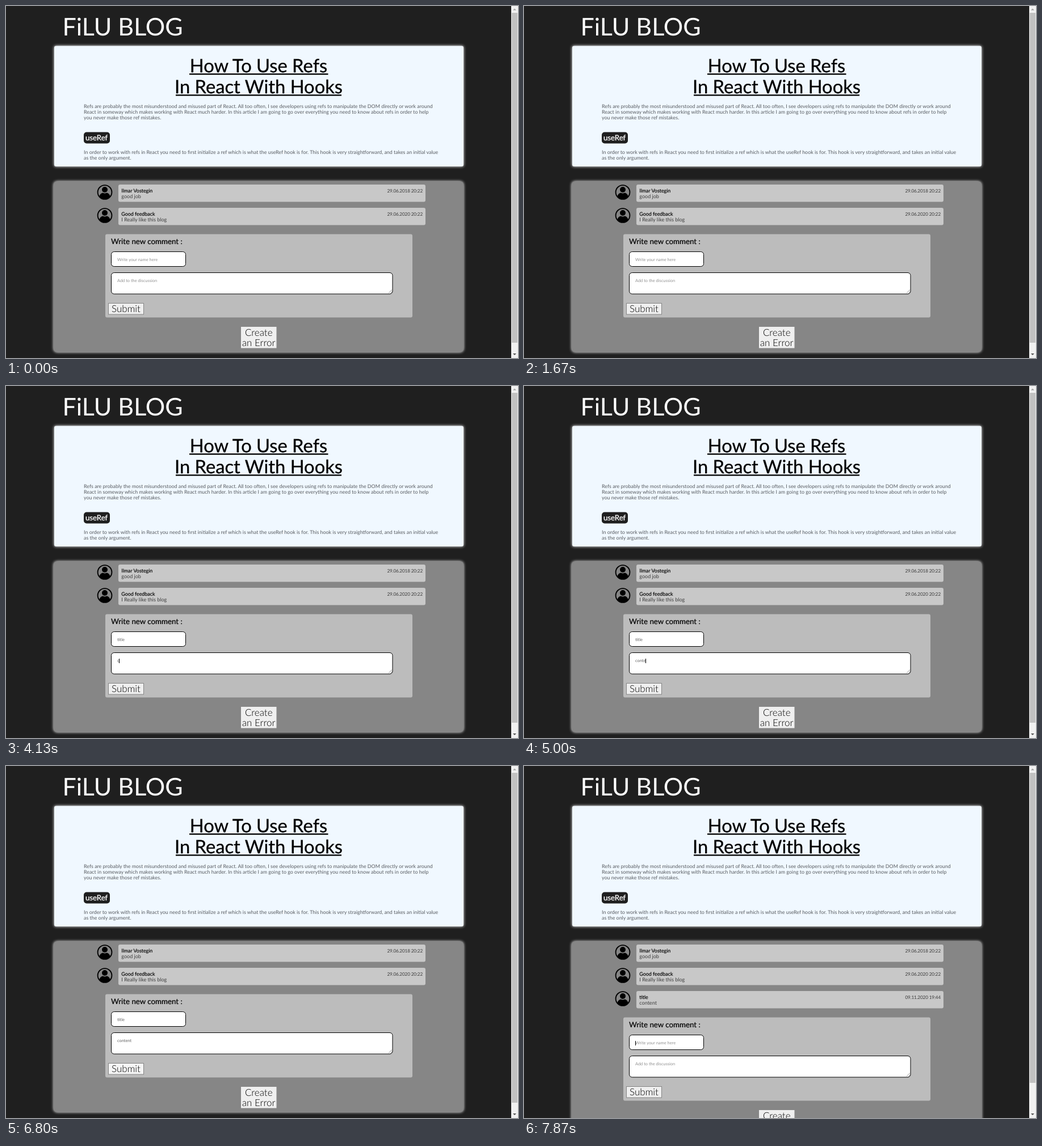
Recreate the animation shown at these times as an HTML page. Size 902 by 621 pixels, loop 8 s.

```html
<!DOCTYPE html>
<html lang="en">
<head>
<meta charset="utf-8">
<title>Blog comments</title>
<style>
  html, body { margin: 0; width: 100%; height: 100%; overflow: hidden; background: #1f1f1f; }
  svg { display: block; width: 902px; height: 621px; }
  text { font-family: Lato, "Open Sans", sans-serif; text-rendering: geometricPrecision; white-space: pre; }
  .logo { font-size: 43px; fill: #fff; }
  .title { font-size: 32.7px; text-anchor: middle; stroke: #000; stroke-width: .3px; }
  .body { font-size: 8.9px; fill: #585c60; }
  .tag { font-size: 13.2px; fill: #fff; stroke: #fff; stroke-width: .3px; }
  .heading { font-size: 13.3px; stroke: #000; stroke-width: .2px; }
  .name { font-size: 8.9px; stroke: #000; stroke-width: .15px; }
  .comment { font-size: 9.05px; fill: #3c3c3c; }
  .date { font-size: 8.2px; letter-spacing: -.15px; text-anchor: end; fill: #3c3c3c; }
  .field { font-size: 7.45px; }
  .button { font-size: 17px; font-weight: 300; text-anchor: middle; }
</style>
</head>
<body>
<svg id="stage" viewBox="0 0 902 621"></svg>
<script>
const LOOP = 8000;
const SUBMIT_AT = 6930;
const PRESS_AT = 6670;
const ROW = 41;
const FIELD_X = 196;

const box = (x, y, w, h, fill, extra = '') =>
  `<rect x="${x}" y="${y}" width="${w}" height="${h}" fill="${fill}" ${extra}/>`;
const label = (cls, x, y, content, extra = '') =>
  `<text class="${cls}" x="${x}" y="${y}" ${extra}>${content}</text>`;
const lines = (cls, x, y, step, list) =>
  list.map((line, i) => label(cls, x, y + i * step, line)).join('');

const avatar = `
  <circle cx="174" cy="328.5" r="12.4" fill="none" stroke="#000" stroke-width="1.9"/>
  <circle cx="174" cy="324" r="5"/>
  <path d="M164.5 336Q166 330.2 170.5 329.6Q174 331.6 177.5 329.6Q182 330.2 183.5 336A12 12 0 0 1 164.5 336Z"/>`;

const comment = (row, name, content, date) => `
  <g id="comment${row}" transform="translate(0 ${row * ROW})">
    ${avatar}
    ${box(198, 315, 541, 30.5, '#c8c8c8', 'rx="3"')}
    ${label('name', 203.3, 328.5, name)}
    ${label('comment', 203.3, 338.5, content)}
    ${label('date', 734, 328.5, date)}
  </g>`;

const header = `
  ${label('logo', 99.5, 51.5, 'FiLU BLOG')}
  ${box(85, 70.5, 721, 212.5, '#f0f8ff', 'rx="3" filter="url(#glow)"')}
  ${lines('title', 445, 117, 37.3, ['How To Use Refs', 'In React With Hooks'])}
  ${box(323, 119, 244.5, 2.3, '#000')}
  ${box(299, 156.2, 292, 2.3, '#000')}
  ${lines('body', 137, 179.8, 10, [
    'Refs are probably the most misunderstood and misused part of React. All too often, I see developers using refs to manipulate the DOM directly or work around',
    'React in someway which makes working with React much harder. In this article I am going to go over everything you need to know about refs in order to help',
    'you never make those ref mistakes.'])}
  ${box(137, 222.5, 46, 20, '#1f1f1f', 'rx="5"')}
  ${label('tag', 140, 237, 'useRef')}
  ${lines('body', 137, 260.8, 10, [
    'In order to work with refs in React you need to first initialize a ref which is what the useRef hook is for. This hook is very straightforward, and takes an initial value',
    'as the only argument.'])}`;

const form = `
  <g id="form">
    ${box(175, 402.5, 541, 147, '#bcbcbc', 'rx="3"')}
    ${label('heading', 185, 419.5, 'Write new comment :')}
    ${box(185.5, 433.5, 131, 26, '#fff', 'rx="5" stroke="#000"')}
    ${box(185.5, 470.5, 495.5, 37.5, '#fff', 'rx="5" stroke="#000"')}
    <path d="M674 506.5L680 500.5M677.5 506.5L680 504" stroke="#777" stroke-width=".8"/>
    ${label('field', FIELD_X, 450.4, '', 'id="nameField"')}
    ${label('field', FIELD_X, 487.4, '', 'id="textField"')}
    ${box(FIELD_X, 444, 1, 8, '#000', 'id="caret"')}
    ${box(180.5, 524.5, 62, 19.5, '#efefef', 'id="submit" stroke="#858585"')}
    ${label('button', 211.5, 540, 'Submit')}
    ${box(414, 566, 62.5, 37.5, '#efefef')}
    ${lines('button', 445.2, 582, 18, ['Create', 'an Error'])}
  </g>`;

const scrollbar = `
  ${box(890, 0, 12, 621, '#f1f1f1')}
  ${box(891, 12, 10, 582, '#c1c1c1', 'id="thumb"')}
  <path d="M893 7.5L896 4.5L899 7.5Z" fill="#a3a3a3"/>
  <path d="M893 613L896 616L899 613Z" fill="#505050"/>`;

const $ = id => document.getElementById(id);

$('stage').innerHTML = `
  <defs>
    <filter id="glow" x="-5%" y="-10%" width="110%" height="120%" color-interpolation-filters="sRGB">
      <feDropShadow dx="0" dy="0" stdDeviation="2.8" flood-color="#fff"/>
    </filter>
  </defs>
  ${box(0, 0, 902, 621, '#1f1f1f')}
  ${header}
  ${box(84, 309.5, 722, 301, '#868686', 'id="panel" rx="6" filter="url(#glow)"')}
  ${comment(0, 'Ilmar Vostegin', 'good job', '29.06.2018 20:22')}
  ${comment(1, 'Good feedback', 'I Really like this blog', '29.06.2020 20:22')}
  ${comment(2, 'title', 'content', '09.11.2020 19:44')}
  ${form}
  ${scrollbar}`;

const fields = {
  name: { node: $('nameField'), top: 444, value: 'title', hint: 'Write your name here',
          keys: [1870, 2000, 2130, 2330, 2530] },
  text: { node: $('textField'), top: 481, value: 'content', hint: 'Add to the discussion',
          keys: [4130, 4270, 4400, 4800, 5000, 5270, 5800] }
};

// Spans in which the caret shows, with the field that has the focus
const caretSpans = [
  [70, 600, 'name'], [1070, 1670, 'name'], [1870, 3070, 'name'],
  [3130, 3670, 'text'], [4130, 6330, 'text'], [7870, LOOP, 'name']
];

function fillField({ node, value, hint, keys }, t) {
  const count = t < SUBMIT_AT ? keys.filter(k => t >= k).length : 0;
  const content = count ? value.slice(0, count) : hint;
  if (node.textContent !== content) node.textContent = content;
  node.setAttribute('fill', count ? '#606060' : '#909090');
  return count ? node.getComputedTextLength() : 0;
}

function render(t) {
  const sent = t >= SUBMIT_AT;
  const width = { name: fillField(fields.name, t), text: fillField(fields.text, t) };

  const span = caretSpans.find(([from, to]) => t >= from && t < to);
  const caret = $('caret');
  caret.setAttribute('visibility', span ? 'visible' : 'hidden');
  if (span) {
    caret.setAttribute('x', Math.floor(FIELD_X + width[span[2]]));
    caret.setAttribute('y', fields[span[2]].top);
  }

  $('submit').setAttribute('fill', t >= PRESS_AT && !sent ? '#f5f5f5' : '#efefef');
  $('comment2').setAttribute('visibility', sent ? 'visible' : 'hidden');
  $('form').setAttribute('transform', `translate(0 ${sent ? ROW : 0})`);
  $('panel').setAttribute('height', 301 + (sent ? ROW : 0));
  $('thumb').setAttribute('height', sent ? 547 : 582);
}

const start = performance.now();
function tick() {
  render((performance.now() - start) % LOOP);
  requestAnimationFrame(tick);
}
tick();
</script>
</body>
</html>
```
